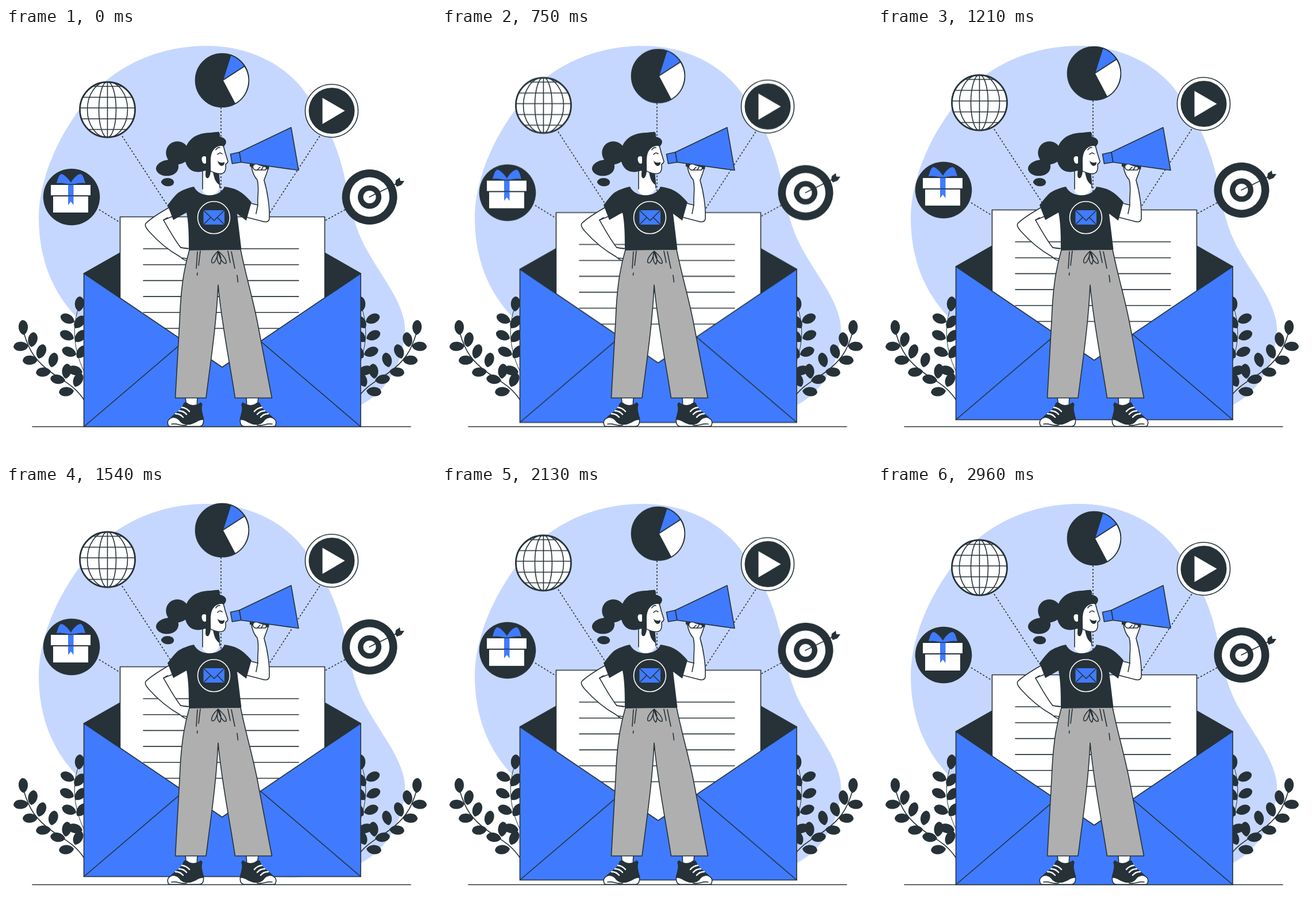
Recreate the animation shown at these times as an HTML page without scripts. Size 748 px wide and 748 px high, loop 3000 ms.

```html
<!DOCTYPE html>
<html lang="en">
<head>
<meta charset="utf-8">
<title>Newsletter</title>
<style>
  html, body { margin: 0; width: 100%; height: 100%; overflow: hidden; background: #fff; }
  svg { display: block; width: 100%; height: 100%; }
  .ink { fill: #263238; }
  .blue { fill: #407bff; }
  .white { fill: #fff; }
  .gray { fill: #afafaf; }
  .none { fill: none; }
  .line { stroke: #263238; stroke-width: 1.6; stroke-linecap: round; stroke-linejoin: round; }
  .dash { stroke-dasharray: 3 3; stroke-linecap: butt; }
  .float { animation: float 3s linear infinite; }
  @keyframes float {
    0%, 97.8%, 100% { transform: translateY(0); }
    49.3% { transform: translateY(-14.75px); }
  }
</style>
</head>
<body>
<svg viewBox="0 0 748 748" xmlns="http://www.w3.org/2000/svg">
  <defs>
    <path id="leaf" d="M0 0C-11 -4 -11 -23 -1 -26C10 -25 11 -6 0 0Z"/>
    <clipPath id="globe"><circle cx="176.5" cy="142" r="48"/></clipPath>

    <g id="plant" class="ink">
      <path class="none line" d="M137 649C120 622 98 613 80 600C52 580 40 562 31 530"/>
      <path class="none line" style="stroke-width:1" d="M137 600C122 570 112 530 126 487"/>
      <use href="#leaf" transform="translate(31 534) rotate(-3)"/>
      <use href="#leaf" transform="translate(39 553) rotate(-92)"/>
      <use href="#leaf" transform="translate(44 555) rotate(12)"/>
      <use href="#leaf" transform="translate(55 577) rotate(-92)"/>
      <use href="#leaf" transform="translate(57 575) rotate(20)"/>
      <use href="#leaf" transform="translate(78 597) rotate(-95)"/>
      <use href="#leaf" transform="translate(79 590) rotate(15)"/>
      <use href="#leaf" transform="translate(103 613) rotate(-80)"/>
      <use href="#leaf" transform="translate(104 610) rotate(8)"/>
      <use href="#leaf" transform="translate(118 631) rotate(-95)"/>
      <use href="#leaf" transform="translate(120 624) rotate(25)"/>
      <use href="#leaf" transform="translate(127 493) rotate(5)"/>
      <use href="#leaf" transform="translate(119 511) rotate(-65)"/>
      <use href="#leaf" transform="translate(120 522) rotate(38)"/>
      <use href="#leaf" transform="translate(118 540) rotate(-65)"/>
      <use href="#leaf" transform="translate(121 546) rotate(42)"/>
      <use href="#leaf" transform="translate(122 568) rotate(-68)"/>
      <use href="#leaf" transform="translate(124 574) rotate(38)"/>
      <use href="#leaf" transform="translate(133 599) rotate(-75)"/>
    </g>

    <g id="shoe">
      <path class="white line" d="M312 642L314 660L332 660L333 642Z"/>
      <path class="white line" d="M282 690C279 683 285 678 291 677L343 677C345 688 342 693 336 693H286C283 693 282 692 282 690Z"/>
      <path class="ink line" d="M288 677C294 670 305 667 309 655C310 650 315 652 318 655C325 658 332 657 339 652L341 655C337 664 343 672 343 681C337 680 333 684 326 687C318 691 309 690 304 685C301 680 296 677 288 677Z"/>
      <path class="none line" d="M288 689C298 687 304 693 314 691"/>
      <path class="none" stroke="#fff" stroke-width="2.4" stroke-linecap="round" d="M301 666Q309 666 314 672M306 660Q314 661 319 667M295 671Q303 671 308 677"/>
    </g>
  </defs>

  <path fill="#c6d7ff" d="M350 31C270 31 195 62 145 120C95 178 57 260 57 330C57 400 80 460 125 505C200 580 300 655 400 672C480 687 560 684 617 656C665 632 694 575 694 525C694 480 655 435 630 390C604 345 600 310 588 255C574 195 549 148 516 106C475 54 410 31 350 31Z"/>

  <use href="#plant"/>
  <use href="#plant" transform="translate(745) scale(-1 1)"/>
  <path class="line" d="M46 693.5H704"/>

  <g class="float">
    <path class="none line dash" d="M162 316L198 338M202 188L300 338M374 138V328M549 183L450 335M590 316L555 335"/>

    <!-- envelope and letter -->
    <path class="ink line" d="M135.500 427L198 391.500H555L617 427L376 590Z"/>
    <path class="white line" d="M198.500 328.500H554.500V600H198.500Z"/>
    <path class="none line" d="M239 384H509M239 411.700H509M239 439.400H509M239 467.100H509M239 494.800H509M239 522.500H509"/>
    <path class="blue line" d="M135.500 427L376 590L617 427V693.500H135.500Z"/>
    <path class="none line" d="M135.500 693.500L309 545.500M617 693.500L443.500 545.500"/>

    <!-- globe -->
    <circle class="white" cx="176.500" cy="142" r="48.500"/>
    <g class="none line" clip-path="url(#globe)">
      <ellipse cx="176.500" cy="142" rx="35" ry="48.500"/>
      <ellipse cx="176.500" cy="142" rx="15" ry="48.500"/>
      <path d="M176.500 93V191M128 101.500H225M128 120.500H225M128 139H225M128 158H225M128 176.500H225"/>
    </g>
    <circle class="none line" style="stroke-width:2.800" cx="176.500" cy="142" r="48"/>

    <!-- pie chart -->
    <circle class="ink line" cx="376" cy="91" r="46.500"/>
    <path class="blue line" d="M377 91L391 47A46.500 46.500 0 0 1 415 66.500Z"/>
    <path class="white line" d="M377 91L415 66.500A46.500 46.500 0 0 1 398.500 131.800Z"/>

    <!-- play -->
    <circle class="white line" cx="566.500" cy="144" r="46"/>
    <circle class="ink" cx="566.500" cy="144" r="40"/>
    <path class="white" d="M550.500 121.500V167L589.500 144Z"/>

    <!-- target -->
    <circle class="ink" cx="632.500" cy="294" r="48"/>
    <circle class="white" cx="632.500" cy="294" r="34.500"/>
    <circle class="ink" cx="632.500" cy="294" r="20.500"/>
    <circle class="white" cx="632.500" cy="294" r="11"/>
    <path class="line" d="M632 294L687 267"/>
    <path class="ink" d="M677 272L678 265L685 260L686 266L693 266L688 273L680 276Z"/>

    <!-- gift -->
    <circle class="ink" cx="114" cy="294" r="49.300"/>
    <path class="white" d="M78 273H147V291H78ZM82 293H143V321H82Z"/>
    <path class="blue" d="M108 270H117.500V308L112.800 302L108 308Z"/>
    <path class="blue" d="M113 269C107 260 100 254 96 254C92 255 90 263 88 270C96 268 104 272 113 271C121 272 130 268 138 270C136 263 134 255 130 254C125 254 118 260 113 269Z"/>
    <path class="none line" d="M108 272H117.500M108 291.800H117.500"/>
  </g>

  <!-- speaker -->
  <use href="#shoe"/>
  <use href="#shoe" transform="translate(751) scale(-1 1)"/>

  <path class="white line" d="M284 312C270 320 253 330 243 340C241 344 244 348 248 353C264 371 285 388 303 398C307 402 312 405 317 405L322 402V384L304 382C293 368 283 350 274 334L294 326Z"/>
  <path class="none line" d="M274 334L281 330M306 400L315 401M304 382L316 384"/>

  <path class="gray line" d="M319 386L408 385C417 430 428 465 437 510L462.500 643.500H398.500C389 580 375 515 369 447C366 515 356 580 348 643.500H294.500L302 510C304 455 309 420 319 386Z"/>
  <path class="none line" d="M333 389L331 418M338 388L335 413M333 426L332.500 430M386 388L390 408M392 389L398 418M402 430L403.500 442"/>
  <path class="none line" d="M369 388C362 394 356 403 358 408C363 412 368 398 369 388C370 398 378 412 383 409C384 403 376 394 369 388C366 397 367 408 372 411C376 404 373 395 369 388"/>

  <path class="white line" d="M422 304L438 308C437 294 441 278 437 264C433 260 429 252 427 242L456 243C455 251 451 258 449 265C455 285 459 312 458 332C457 338 451 338 445 336L414 328Z"/>
  <path class="none line" d="M438 308L435 323"/>

  <path class="white" d="M342 240V284C350 296 365 293 372 278L370 248Z"/>
  <path class="none line" d="M342 245V280M370 255L372 278"/>
  <path class="ink" d="M360 250C362 262 365 270 372 273L370 250Z"/>

  <path class="ink" d="M327 276C317 278 306 282 299 287C291 294 286 302 281 308L291 334L314 321C318 340 318 365 318 386.500L409.500 385L402 323L418 335L427 303C420 295 412 287 404 283C397 279 388 277 380 276C372 296 336 296 327 276Z"/>

  <circle class="ink" stroke="#fff" stroke-width="1.600" cx="361.500" cy="329.800" r="28"/>
  <path class="blue" d="M343.500 317H380V342H343.500Z"/>
  <path class="none line" d="M343.500 317L362 335L380 317M343.500 342L356 329.500M380 342L367.500 329.500"/>

  <!-- head -->
  <g class="ink">
    <path d="M318 212C314 199 297 192 285 202C276 210 277 223 283 230C289 241 305 240 318 228Z"/>
    <path d="M284 229C271 230 260 237 261 246C264 257 280 260 291 255C301 250 303 238 296 231Z"/>
    <path d="M281 261C273 261 269 266 270 269C274 276 284 277 290 273C295 268 291 261 281 261Z"/>
  </g>
  <path class="white line" d="M350 200L377 203C380 208 380 214 382 219L386 232C386 235 383 236 382 237C383 243 382 252 376 253C368 255 358 251 352 246Z"/>
  <path class="ink" d="M311 226C309 203 322 182 357 182C361 181 365 181 367 181C370 179 373 182 372 189C382 191 387 198 379 206C373 203 364 206 359 215C354 225 357 240 356 250C355 258 352 264 348 260C346 256 348 250 347 248C328 255 313 247 311 226Z"/>
  <path class="white" d="M348 224C343 221 339 225 341 231C342 236 346 237 348 235Z"/>
  <path class="none line" d="M368 220Q372 215 376 219M365 212Q368 207 372 208"/>
  <path class="ink" d="M368 231C372 235 377 235 380 233C381 241 371 244 368 231Z"/>

  <!-- megaphone -->
  <path class="blue line" d="M390.500 219.500L406 216L409 233.500L393.500 236Z"/>
  <path class="blue line" d="M406 216L496 173L509 247.500L409 233.500Z"/>
  <path class="ink" d="M424 236L458 240.500L457 246L424 241Z"/>
  <path class="white line" d="M430 239C428 244 432 248 437 247L451 247C454 245 453 240 449 241L440 238C436 236 432 236 430 239Z"/>
  <path class="none line" d="M437 247L442 242M444 247L447 242"/>
</svg>
</body>
</html>
```
